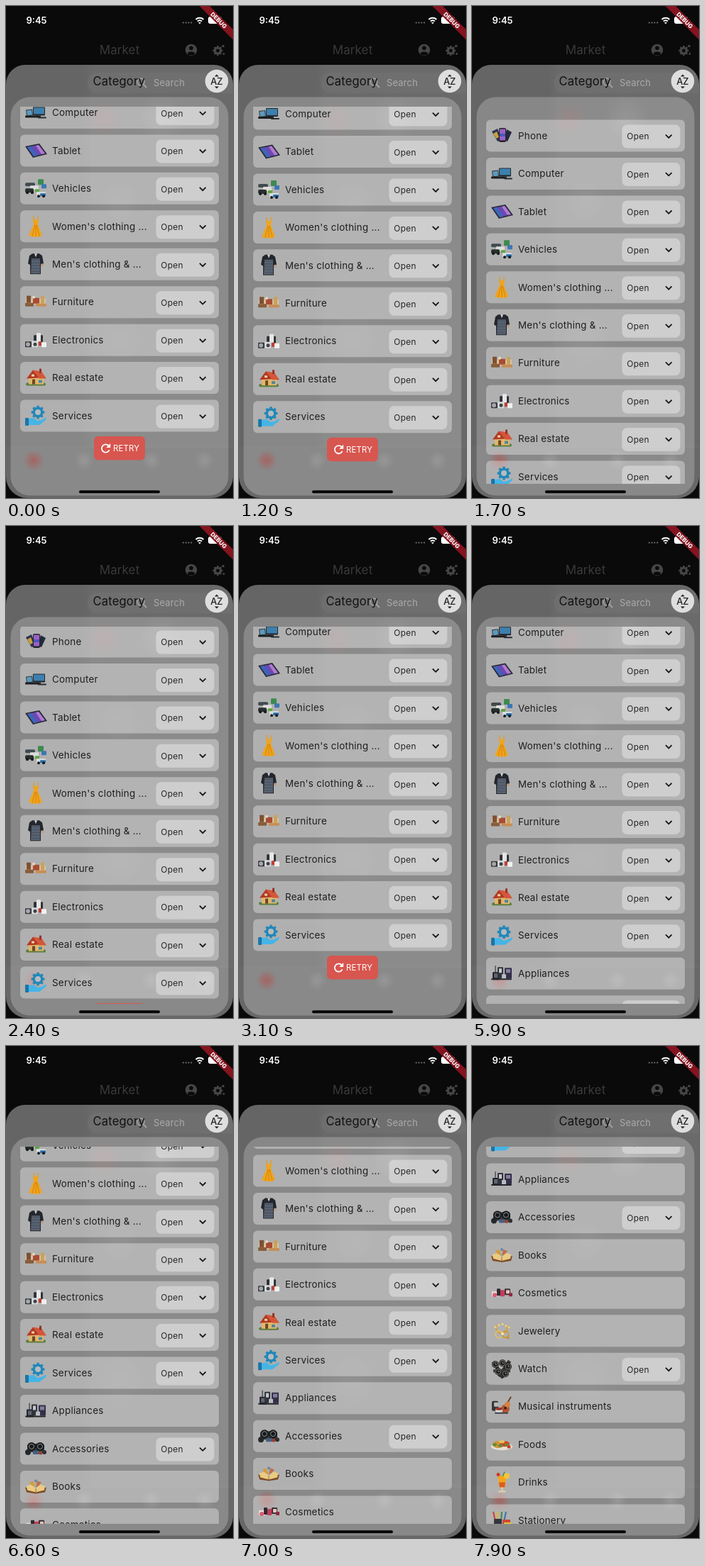
Animation of 320x694 px, one loop 8 s. Source, as an HTML page with a canvas:

```html
<!DOCTYPE html>
<html lang="en">
<head>
<meta charset="utf-8">
<title>Category list</title>
<style>
html, body { margin: 0; width: 100%; height: 100%; overflow: hidden; background: #0a0a0a; }
canvas { display: block; width: 320px; height: 694px; }
</style>
</head>
<body>
<canvas id="stage"></canvas>
<script>
const W = 320, H = 694, LOOP = 8000, PITCH = 53.45, FONT = 'Inter, "Open Sans", sans-serif';
const canvas = document.getElementById('stage');
const g = canvas.getContext('2d');
const dpr = window.devicePixelRatio || 1;
canvas.width = W * dpr;
canvas.height = H * dpr;

// [time, y of the first card's centre]
const scroll = [
  [0, 97], [1150, 97], [1300, 108], [1400, 132], [1500, 156], [1600, 173], [1700, 183], [1800, 185],
  [1950, 185], [2100, 183], [2250, 176], [2400, 163], [2500, 148], [2600, 127], [2700, 106], [2800, 95],
  [2900, 93.5], [3100, 96], [3400, 96.7], [3700, 97], [5700, 97], [5900, 96.7],
  [6000, 88], [6200, 46], [6400, 4], [6600, -20], [6800, -32], [7000, -37.8], [7400, -43], [7600, -43],
  [7700, -78], [7800, -205], [7900, -346.5], [8000, -450]
];

// Monotone cubic through the key points
function curve(keys, t) {
  let i = 0;
  while (i < keys.length - 2 && t >= keys[i + 1][0]) i++;
  const rise = k => k < 0 || k > keys.length - 2 ? 0 : (keys[k + 1][1] - keys[k][1]) / (keys[k + 1][0] - keys[k][0]);
  const slope = k => {
    const a = rise(k - 1), b = rise(k);
    return a * b > 0 ? 2 * a * b / (a + b) : 0;
  };
  const [t0, a] = keys[i], [t1, b] = keys[i + 1];
  const d = t1 - t0, u = (t - t0) / d, v = 1 - u;
  return a * (1 + 2 * u) * v * v + b * u * u * (3 - 2 * u) + d * (slope(i) * u * v * v - slope(i + 1) * u * u * v);
}

function box(color, x, y, w, h, r = 0) {
  g.fillStyle = color;
  g.beginPath();
  g.roundRect(x, y, w, h, r);
  g.fill();
}
function disc(color, x, y, r, ry = r) {
  g.fillStyle = color;
  g.beginPath();
  g.ellipse(x, y, r, ry, 0, 0, 7);
  g.fill();
}
function poly(color, ...p) {
  g.fillStyle = color;
  g.beginPath();
  for (let i = 0; i < p.length; i += 2) g.lineTo(p[i], p[i + 1]);
  g.fill();
}
function line(color, width, ...p) {
  g.strokeStyle = color;
  g.lineWidth = width;
  g.beginPath();
  for (let i = 0; i < p.length; i += 2) g.lineTo(p[i], p[i + 1]);
  g.stroke();
}
function ring(color, width, x, y, r, from = 0, to = 7) {
  g.strokeStyle = color;
  g.lineWidth = width;
  g.beginPath();
  g.arc(x, y, r, from, to);
  g.stroke();
}
function label(str, x, y, size, color, weight = 400, gap = 0, align = 'left') {
  g.font = `${weight} ${size}px ${FONT}`;
  g.letterSpacing = gap + 'px';
  g.textAlign = align;
  g.fillStyle = color;
  g.fillText(str, x, y);
}
function glow(x, y, r, rgb, alpha) {
  const f = g.createRadialGradient(x, y, 0, x, y, r);
  f.addColorStop(0, `rgba(${rgb},${alpha})`);
  f.addColorStop(1, `rgba(${rgb},0)`);
  g.fillStyle = f;
  g.fillRect(x - r, y - r, 2 * r, 2 * r);
}
function gear(color, x, y, r, hole, holeColor) {
  g.save();
  g.translate(x, y);
  for (let i = 0; i < 8; i++) {
    g.rotate(Math.PI / 4);
    box(color, -r * .22, -r * 1.25, r * .44, r * .6);
  }
  g.restore();
  disc(color, x, y, r);
  disc(holeColor, x, y, hole);
}

// Small pictures, drawn around their centre
const art = {
  phone() {
    poly('#2a3350', -14, -6, -6, -10, 0, 6, -6, 8);
    poly('#c8a13c', -12, -3, -7, -6, -4, 2, -8, 4);
    poly('#222a3d', 7, -9, 14, -5, 8, 8, 3, 6);
    box('#26232d', -4, -11, 10, 20, 2);
    box('#9a62c4', -3, -9.5, 8, 16, 1);
    box('#4b58b8', -3, -3, 8, 4);
  },
  computer() {
    box('#24282d', -4, -8, 17, 12, 1);
    box('#3c80ae', -3, -7, 15, 9);
    box('#25282c', 2, 4, 5, 3);
    poly('#32373b', -14, -4, -5, -5, -4, 4, -13, 5);
    poly('#5b9abc', -13, -3, -6, -4, -5, 3, -12, 4);
    box('#1c1f22', -15, 4, 19, 3, 1);
    box('#292d30', 3, 6, 12, 2, 1);
  },
  tablet() {
    poly('#2b2a38', -15, -6, 5, -10, 16, 5, -4, 10);
    poly('#684ab2', -12, -5, 4, -8, 13, 4, -3, 8);
    poly('#b27ad0', 0, -7, 4, -8, 13, 4, 8, 5);
    poly('#3a67b8', -12, -5, -7, -6, 2, 7, -3, 8);
  },
  vehicles() {
    box('#404b50', -15, -8, 14, 5, 2);
    box('#3c8a50', 3, -13, 8, 8, 1);
    box('#3b78b4', 8, -6, 7, 6, 1);
    box('#dbdcda', -8, -4, 12, 6, 1);
    box('#28302e', -15, 0, 12, 6, 2);
    box('#5fa640', -1, 1, 6, 4, 1);
    box('#d9dfe0', 1, 5, 13, 6, 1);
    box('#286faa', 6, 7, 8, 4, 1);
    for (const x of [-12, -5, 4, 11]) disc('#17191a', x, x < 0 ? 6 : 11, 2);
  },
  dress() {
    line('#e29a18', 1.2, -3, -15, -3, -8);
    line('#e29a18', 1.2, 3, -15, 3, -8);
    poly('#f0a41c', -4, -11, 0, -9, 4, -11, 3, -3, 9, 13, 4, 15, -4, 15, -10, 13, -3, -3);
    for (const x of [-5, 0, 5]) line('#ca7b0b', .8, x / 4, -2, x, 14);
  },
  shirt() {
    poly('#23262d', -5, -15, 5, -15, 9, -12, 11, -1, 7, 1, 7, 14, -8, 14, -8, 1, -11, -1, -9, -12);
    poly('#596270', -6, -8, 6, -8, 6, 13, -7, 13);
    for (let y = -6; y < 12; y += 4) line('#414957', .8, -6, y, 6, y);
    poly('#d2d4d6', -2, -15, 2, -15, 0, -10);
    disc('#c09a80', 9, 1, 2);
  },
  furniture() {
    box('#d8c2a0', -14, -5, 28, 8);
    box('#7d5131', -13, -9, 6, 10);
    box('#a84c34', -4, -6, 9, 8, 1);
    box('#c8a25e', 7, -9, 5, 11);
    box('#885d3b', -15, 1, 12, 5, 1);
    box('#c88d54', 0, 2, 15, 4, 1);
    disc('#e7d9bd', -3, -7, 2);
  },
  electronics() {
    box('#303336', -3, -7, 13, 10, 1);
    box('#e5e6e8', 1, -10, 6, 13, 1);
    box('#34373b', -15, 2, 9, 8, 1);
    disc('#a4a8ad', -11, 6, 3);
    box('#d6d9dc', -6, 1, 9, 9, 1);
    disc('#3f4348', -1, 6, 2.5);
    box('#c13f35', 4, 2, 4, 6);
    box('#f0f0f0', 8, 3, 7, 7, 1);
  },
  house() {
    box('#597e3b', -14, 7, 28, 4, 2);
    box('#dfb76b', -10, -2, 21, 11);
    poly('#b33826', -13, 1, -4, -11, 5, 0);
    poly('#d3563a', -4, -11, 8, -9, 15, 1, 5, 1);
    box('#963427', 5, -13, 3, 6);
    box('#704626', -5, 2, 4, 7);
    box('#5184a0', 4, 3, 5, 4);
    box('#e9d29d', -6, -5, 4, 3);
  },
  services() {
    gear('#2187b8', 3, -5, 7.5, 4, '#b4bcc0');
    box('#1b75a7', -15, 3, 5, 11, 1);
    poly('#45b5e6', -10, 4, -3, 3, 2, 7, 8, 6, 15, 2, 14, 6, 5, 13, -10, 13);
  },
  appliances() {
    box('#22252a', -13, -2, 10, 11, 1);
    box('#5d6670', -11, 0, 6, 6);
    box('#31343b', -6, -9, 8, 16, 1);
    box('#c3c8cd', -4, -7, 4, 6);
    box('#343048', 4, -8, 10, 15, 1);
    box('#877c9b', 6, -6, 6, 5);
    box('#b8bcc2', 0, 1, 6, 7, 1);
    line('#222', 1, -9, -11, -9, -2);
    box('#24262a', -15, 7, 29, 2, 1);
  },
  accessories() {
    box('#34383b', -12, -7, 24, 12, 4);
    for (const x of [-6, 6]) {
      disc('#17191b', x, -3, 6);
      ring('#8a9196', 1, x, -3, 3.5);
    }
    disc('#25282b', -11, 5, 4);
    box('#495f80', -4, 3, 9, 5, 1);
    disc('#9b4030', 7, 6, 2.5);
    disc('#2c2f31', 12, 5, 3);
  },
  book() {
    poly('#7e4d29', -15, 1, 0, 5, 15, 1, 13, 8, 0, 10, -13, 8);
    poly('#eacb83', -13, -1, -6, -3, 0, 3, 6, -3, 13, -1, 12, 5, 0, 8, -12, 5);
    line('#95632e', 1, 0, 3, 0, 8);
    poly('#d49b3a', -9, -6, -4, -8, 0, 1, -6, -2);
    poly('#bf6e49', 2, -8, 8, -6, 5, -2, 0, 1);
    disc('#6d85a5', 0, -8, 2);
  },
  cosmetics() {
    box('#eadcda', -14, -2, 10, 7, 1);
    box('#302a30', -7, -6, 5, 10, 1);
    box('#c33d58', -2, -4, 6, 9, 1);
    box('#3b3038', 4, -6, 8, 9, 1);
    box('#eac3bc', 6, -4, 5, 5);
    box('#8e2940', 10, 0, 5, 5, 1);
    disc('#d95b71', -10, 3, 3);
  },
  jewelry() {
    ring('#d3a030', 1.8, 0, -4, 8, -.5, 3.7);
    ring('#e7c15d', 1.5, -4, 5, 5);
    ring('#cb9327', 1.6, 5, 5, 4.5);
    for (const x of [-9, -4, 1, 6, 10]) disc('#edcf7f', x, -10 + Math.abs(x) * .5, 1.6);
    disc('#f4e7bd', 1, 4, 2);
    disc('#c98f26', 9, 10, 1.8);
  },
  watch() {
    line('#292a2c', 5, -12, -10, 2, 13);
    line('#33302e', 5, 11, -11, -4, 11);
    line('#3c3d3f', 4, -12, 3, 12, 3);
    for (const [x, y] of [[-9, -6], [1, -8], [9, -3], [-5, 4], [5, 7]]) {
      disc('#1c1d1f', x, y, 5);
      ring('#817c74', 1, x, y, 3.8);
      line('#bbb', .7, x, y - 2, x, y, x + 2, y);
    }
  },
  music() {
    line('#65482f', 2, 13, -14, 3, 3);
    box('#363434', -14, -8, 9, 14, 2);
    box('#b8b9bb', -11, -6, 6, 6, 1);
    disc('#b35332', 5, 3, 6);
    disc('#d48343', 8, -3, 4);
    disc('#35231c', 5, 2, 2);
    disc('#dadada', -4, 5, 5, 4);
    disc('#973529', -4, 3, 5, 2);
    box('#3d4044', -10, 8, 19, 2, 1);
  },
  food() {
    disc('#e5e0d5', 0, 3, 15, 5);
    disc('#ce9438', -5, 0, 8, 5);
    disc('#c64b2c', 4, -1, 7, 4);
    for (const x of [-10, -2, 7]) disc('#618c36', x, 2 - Math.abs(x) * .2, 3, 2);
    disc('#ecc15a', 0, -4, 4, 2);
    disc('#d53928', 10, 3, 2.5);
  },
  drink() {
    line('#3f963f', 1.5, 1, -8, 4, -15);
    poly('#f3a51c', -6, -9, 7, -9, 4, 7, -3, 7);
    poly('#df5c18', -4, 0, 5, 0, 4, 7, -3, 7);
    box('#e4c596', -1, 7, 3, 5);
    box('#e0d0b5', -5, 12, 11, 2, 1);
    disc('#f4c53b', 7, -9, 4);
    disc('#c83b2c', -5, -11, 2.5);
  },
  stationery() {
    for (const [i, c] of ['#d13d32', '#e6b42e', '#3b8b48', '#3672b0'].entries()) line(c, 2, -9 + i * 4, 2, -12 + i * 6, -12);
    box('#31363c', -11, -2, 11, 11, 1);
    box('#ca4837', 1, -1, 11, 8, 1);
    box('#e9c143', 3, 3, 11, 5, 1);
    box('#d7d7d4', -14, 6, 12, 4, 1);
  }
};

const items = [
  ['Phone', 'phone', 1], ['Computer', 'computer', 1], ['Tablet', 'tablet', 1], ['Vehicles', 'vehicles', 1],
  ["Women's clothing ...", 'dress', 1], ["Men's clothing & ...", 'shirt', 1], ['Furniture', 'furniture', 1],
  ['Electronics', 'electronics', 1], ['Real estate', 'house', 1], ['Services', 'services', 1],
  ['Appliances', 'appliances', 0], ['Accessories', 'accessories', 1], ['Books', 'book', 0],
  ['Cosmetics', 'cosmetics', 0], ['Jewelery', 'jewelry', 0], ['Watch', 'watch', 1],
  ['Musical instruments', 'music', 0], ['Foods', 'food', 0], ['Drinks', 'drink', 0], ['Stationery', 'stationery', 0]
];

function statusBar() {
  label('9:45', 28.5, 24.7, 13, '#fff', 600);
  for (let i = 0; i < 4; i++) disc('#77777a', 249.8 + i * 3.8, 23.5, 1.1);
  g.lineCap = 'butt';
  for (const r of [4.6, 8.2]) ring('#fff', 2, 273, 25, r, -2.3, -.84);
  poly('#fff', 273, 25.5, 271, 23, 275, 23);
  box('#fff', 285, 15, 19, 10, 3);

  g.save();
  g.translate(W, 0);
  g.rotate(Math.PI / 4);
  box('#84141f', -40, 23.3, 80, 10.2);
  label('DEBUG', 0, 31.4, 8.2, '#fff', 800, 0, 'center');
  g.restore();
}

function appBar() {
  label('Market', 160, 68, 17, '#393939', 400, .1, 'center');
  disc('#464646', 261, 62, 8.3);
  disc('#0a0a0a', 261, 59.3, 2.8);
  disc('#0a0a0a', 261, 67, 5, 2.6);
  gear('#464646', 298.5, 63, 5.6, 2.4, '#0a0a0a');
  disc('#464646', 306, 56.5, 1.8);
  disc('#464646', 307, 67.5, 1.4);
}

function sheet() {
  g.save();
  g.beginPath();
  g.roundRect(0, 83, W, H - 83, [27, 27, 30, 30]);
  g.clip();
  box('#656565', 0, 83, W, H - 83);
  const side = g.createLinearGradient(108, 0, 122, 0);
  side.addColorStop(0, 'rgba(255,255,255,0)');
  side.addColorStop(1, 'rgba(255,255,255,.035)');
  g.fillStyle = side;
  g.fillRect(108, 83, 212, 540);
  box('rgba(255,255,255,.035)', 115, 94, 220, 29, 14);
  box('rgba(255,255,255,.02)', 0, 620, W, 74);
  glow(138, 160, 26, '190,90,90', .2);
  glow(218, 158, 34, '255,255,255', .09);
  glow(160, 275, 40, '255,255,255', .05);
  glow(160, 470, 50, '255,255,255', .05);
  box('rgba(255,255,255,.22)', 6.5, 128.5, 307, 562, 27);
  glow(39, 641, 15, '200,50,45', .42);
  for (const x of [110, 205, 280]) glow(x, 641, 14, '255,255,255', .12);
  g.restore();

  ring('#a2a2a2', 1.8, 190, 107, 4.8);
  line('#a2a2a2', 2, 193.5, 110.5, 198, 115);
  label('Search', 208, 112.8, 13, '#aaa', 400, .15);
  label('Category', 122.5, 112.2, 16.6, '#111', 400, .15);
  disc('#dedede', 297, 106, 16.3);
  label('A', 288.3, 111, 13, '#222', 500);
  label('Z', 297.3, 111, 13, '#222', 500);
  poly('#222', 294, 99.5, 300, 99.5, 297, 96.5);
  poly('#222', 294, 113.5, 300, 113.5, 297, 116.5);
}

function card([name, pic, open], y) {
  box('rgba(255,255,255,.34)', 20, y - 22.5, 280, 45, 6);
  g.save();
  g.translate(42, y);
  art[pic]();
  g.restore();
  label(name, 65, y + 4.7, 13.4, '#1e1e1e', 400, .25);
  if (!open) return;
  box('rgba(255,255,255,.35)', 211.5, y - 15.5, 82, 33, 7);
  label('Open', 218.3, y + 5.3, 12, '#262626', 400, .25);
  line('#161616', 1.8, 273, y - 1.4, 277.3, y + 2.9, 281.6, y - 1.4);
}

function retry(y, t) {
  box('#d7564f', 124, y, 72, 33.5, 6);
  const press = Math.max(0, 1 - Math.abs(t - 4550) / 250);
  if (press) box(`rgba(255,255,255,${press * .16})`, 124, y, 72, 33.5, 6);
  ring('#fff', 1.8, 140.5, y + 17, 5.6, .4, 5.5);
  poly('#fff', 147.2, y + 10, 147.2, y + 16, 141.2, y + 16);
  label('RETRY', 151, y + 21.2, 11.5, '#fff', 400, .1);
}

function draw(now) {
  const t = Math.floor(now % LOOP / 100) * 100;
  const first = curve(scroll, t);
  const count = t < 5700 ? 10 : items.length;

  g.setTransform(dpr, 0, 0, dpr, 0, 0);
  box('#0a0a0a', 0, 0, W, H);
  appBar();
  sheet();

  g.save();
  g.beginPath();
  g.rect(0, 142, W, 532);
  g.clip();
  for (let i = 0; i < count; i++) {
    const y = first + i * PITCH;
    if (y > 118 && y < 698) card(items[i], y);
  }
  retry(first + (count - 1) * PITCH + 29, t);
  g.restore();

  box('#060606', 103, 683.3, 114, 4, 2);
  statusBar();
}

const start = performance.now();
function tick() {
  draw(performance.now() - start);
  requestAnimationFrame(tick);
}
tick();
</script>
</body>
</html>
```
